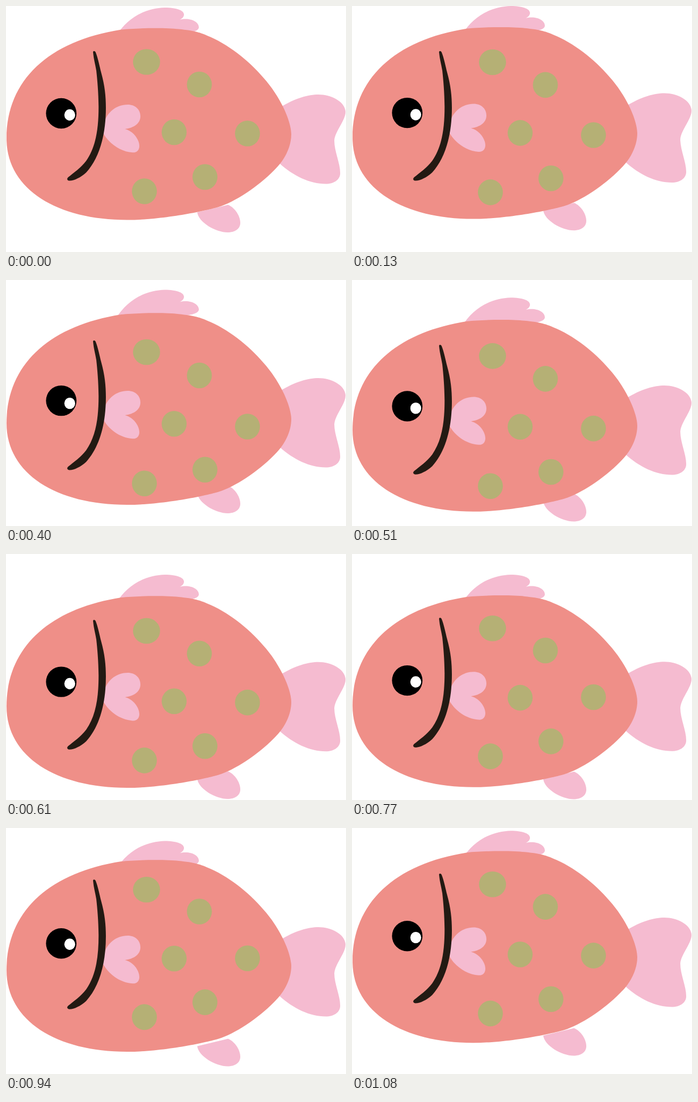
An HTML page for the animation above (1.11 s loop, 640 px wide and 464 px high).

```html
<!DOCTYPE html>
<html lang="en">
<head>
<meta charset="utf-8">
<title>Fish</title>
<style>
  html, body { margin: 0; width: 100%; height: 100%; overflow: hidden; background: #fff; }
  svg { display: block; width: 640px; height: 464px; }
  .fin { fill: #f5bbd0; }
  .spot { fill: #b5b075; }
</style>
</head>
<body>
<svg viewBox="0 0 640 464">
  <path class="fin" d="M360 389L418 375C432 381 441 397 441 409C441 421 430 427 417 427C395 427 362 408 360 389Z"/>
  <path class="fin" d="M207 57C228 22 262 4 299 3C320 3 335 8 335 16C335 21 331 24 327 26C345 21 363 29 363 40C363 47 350 50 340 51V56Z"/>
  <path class="fin" d="M500 203L515 192C545 173 570 167 588 167C612 167 637 180 639 198C641 214 619 236 618 254C618 275 630 298 629 317C628 328 617 335.5 602 335.5C572 335.5 540 320 515 297L500 284Z"/>
  <path fill="#ef8f88" d="M1 250C1 140 80 66 217 44.5C245 41.6 300 40.6 325 43.6C355 46.6 365 49.6 385 58.6C425 76.6 462 107.6 490 141.6C520 178 537 220 537 242C537 263 527 284 515 298.5C487 331.5 440 364.5 405 377.5C385 384.5 300 403.5 228 403.5C95 403.5 1 345 1 250Z"/>
  <path class="fin" d="M184 222C190 200 208 186 229 186C243 186 253 195 253 208C253 222 240 230 224 232C240 236 251 252 251 264C251 272 246 277 238 276.3C215 275 192 258 182 238Z"/>
  <circle cx="104" cy="202.5" r="28.7"/>
  <ellipse fill="#fff" cx="120" cy="205.5" rx="10.2" ry="10.7"/>
  <path fill="#231a13" d="M164 88C163 84 168 84 169 88C173 98 176 113 179 125C186 150 188 170 188 192C188 246 174.5 288 151 314C140 324 127 330 119 329.5C115 329 114 326 117 323C127 315 141 305 151 292C169 266 174.3 232 174.3 190C174 163 172 140 170 122C168 110 165 100 164 88Z"/>
  <ellipse class="spot" cx="264.5" cy="105.5" rx="25.5" ry="24.3"/>
  <ellipse class="spot" cx="364" cy="148" rx="23.5" ry="24.3"/>
  <ellipse class="spot" cx="316.5" cy="238" rx="23.5" ry="24.3"/>
  <ellipse class="spot" cx="260.5" cy="349.5" rx="23.5" ry="24.3"/>
  <ellipse class="spot" cx="374.5" cy="322.5" rx="23.5" ry="24.3"/>
  <ellipse class="spot" cx="454.5" cy="240.5" rx="23.5" ry="24.3"/>
</svg>
<script>
const LOOP = 1110, STEPS = 33, DROP = 40, STAGGER = 11.2;
const parts = [...document.querySelector('svg').children];

// cubic-bezier(.6, 0, .4, 1), solved for x by bisection
function ease(x) {
  let lo = 0, hi = 1, u = 0.5;
  for (let i = 0; i < 20; i++) {
    u = (lo + hi) / 2;
    const bx = 1.8 * u * (1 - u) ** 2 + 1.2 * u * u * (1 - u) + u ** 3;
    if (bx < x) lo = u; else hi = u;
  }
  return u * u * (3 - 2 * u);
}

// Down during the first half of the loop, back up during the second
function sink(t) {
  const p = (((t % LOOP) + LOOP) % LOOP) / LOOP * 2;
  return DROP * ease(p < 1 ? p : 2 - p);
}

function draw(now) {
  const t = Math.floor((now % LOOP) / LOOP * STEPS + 0.2) * LOOP / STEPS;
  parts.forEach((part, i) => {
    // front parts lead, the ones behind follow
    const delay = (parts.length - 1 - i) * STAGGER;
    const y = sink(t - delay) - sink(-delay);
    part.setAttribute('transform', `translate(0 ${y.toFixed(2)})`);
  });
}

const start = performance.now();
function tick() {
  draw(performance.now() - start);
  requestAnimationFrame(tick);
}
tick();
</script>
</body>
</html>
```
